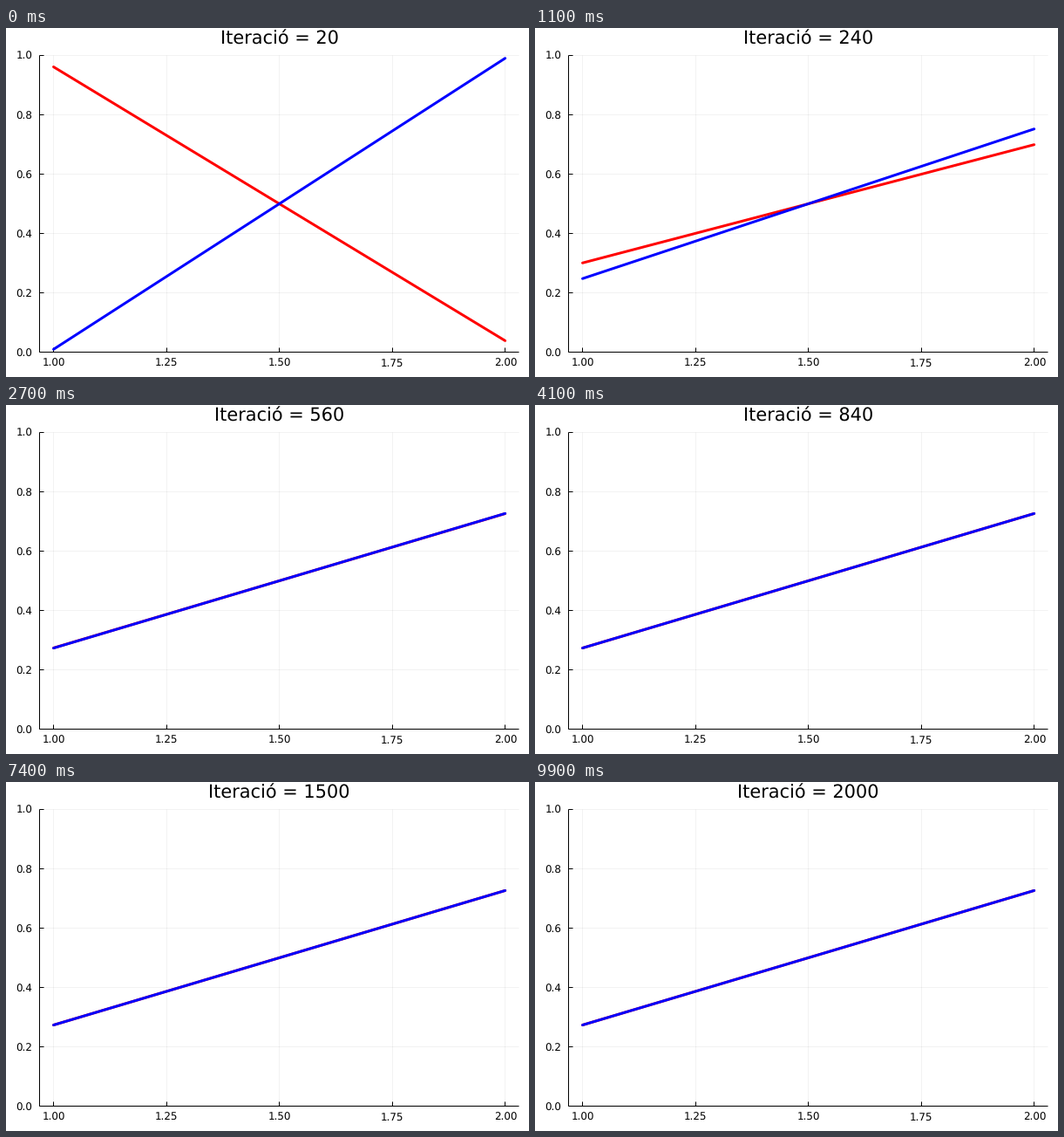
A matplotlib script for the animation above (10 s loop, 600 px wide and 400 px high).

```python
import matplotlib.pyplot as plt
import numpy as np
from matplotlib.animation import FuncAnimation

W, H, DPI = 600, 400, 100
FRAMES, INTERVAL, STEP = 100, 100, 20
LEFT, RIGHT, TOP, BOTTOM = 38.95, 588.2, 31.2, 371.75
XMIN, XMAX = 0.97, 2.03
PX = 72 / DPI

plt.rcParams.update({
    "font.family": "DejaVu Sans",
    "text.hinting": "none",
    "text.hinting_factor": 8,
})


def px(x):
    return LEFT + (x - XMIN) / (XMAX - XMIN) * (RIGHT - LEFT)


def py(y):
    return BOTTOM - y * (BOTTOM - TOP)


def sigmoid(z):
    return 1 / (1 + np.exp(-z))


def probabilities(n):
    """Both values at x = 1 after n iterations, converging in log-odds."""
    gap = 0.4535 * np.exp(-0.01535 * (n - 160))
    skew = 0.019 * gap ** 2
    return sigmoid(-0.976 + gap + skew), sigmoid(-0.976 - gap + skew)


fig = plt.figure(figsize=(W / DPI, H / DPI), dpi=DPI, facecolor="white")
ax = fig.add_axes([0, 0, 1, 1])
ax.set(xlim=(0, W), ylim=(H, 0))
ax.axis("off")


def rule(x0, y0, x1, y1, alpha=1.0):
    """Hairline on whole pixels."""
    ax.plot(np.floor([x0, x1]), np.floor([y0, y1]), color="black", alpha=alpha,
            lw=PX, solid_capstyle="butt", zorder=1)


def label(x, y, text, ha, size=8.57):
    return ax.text(x, y, text, ha=ha, va="baseline", fontsize=size, color="black")


xticks = [px(v) for v in np.linspace(1, 2, 5)]
yticks = [py(v) for v in np.linspace(0, 1, 6)]

for x in xticks:
    rule(x, TOP, x, BOTTOM, 0.05)
for y in yticks:
    rule(LEFT, y, RIGHT, y, 0.05)

rule(LEFT, BOTTOM, RIGHT, BOTTOM)
rule(LEFT, TOP, LEFT, BOTTOM)

for i, x in enumerate(xticks):
    rule(x, BOTTOM, x, BOTTOM - 5)
    label(x + 0.3, 388, f"{1 + i / 4:.2f}", "center")
for i, y in enumerate(yticks):
    rule(LEFT, y, LEFT + 5, y)
    label(30.5, y + 5.1, f"{i / 5:.1f}", "right")

ends = [px(1), px(2)]
lines = [
    ax.plot(ends, [0, 0], color=c, lw=3 * PX, solid_capstyle="round", zorder=3)[0]
    for c in ("#ff0000", "#0000ff")
]
title = label(313.6, 19, "", "center", 15)


def update(frame):
    n = STEP * (frame + 1)
    for line, p in zip(lines, probabilities(n)):
        line.set_ydata([py(p), py(1 - p)])
    title.set_text(f"Iteració = {n}")
    return [*lines, title]


anim = FuncAnimation(fig, update, frames=FRAMES, interval=INTERVAL,
                     repeat=True, repeat_delay=0, blit=False)
plt.show()
```
